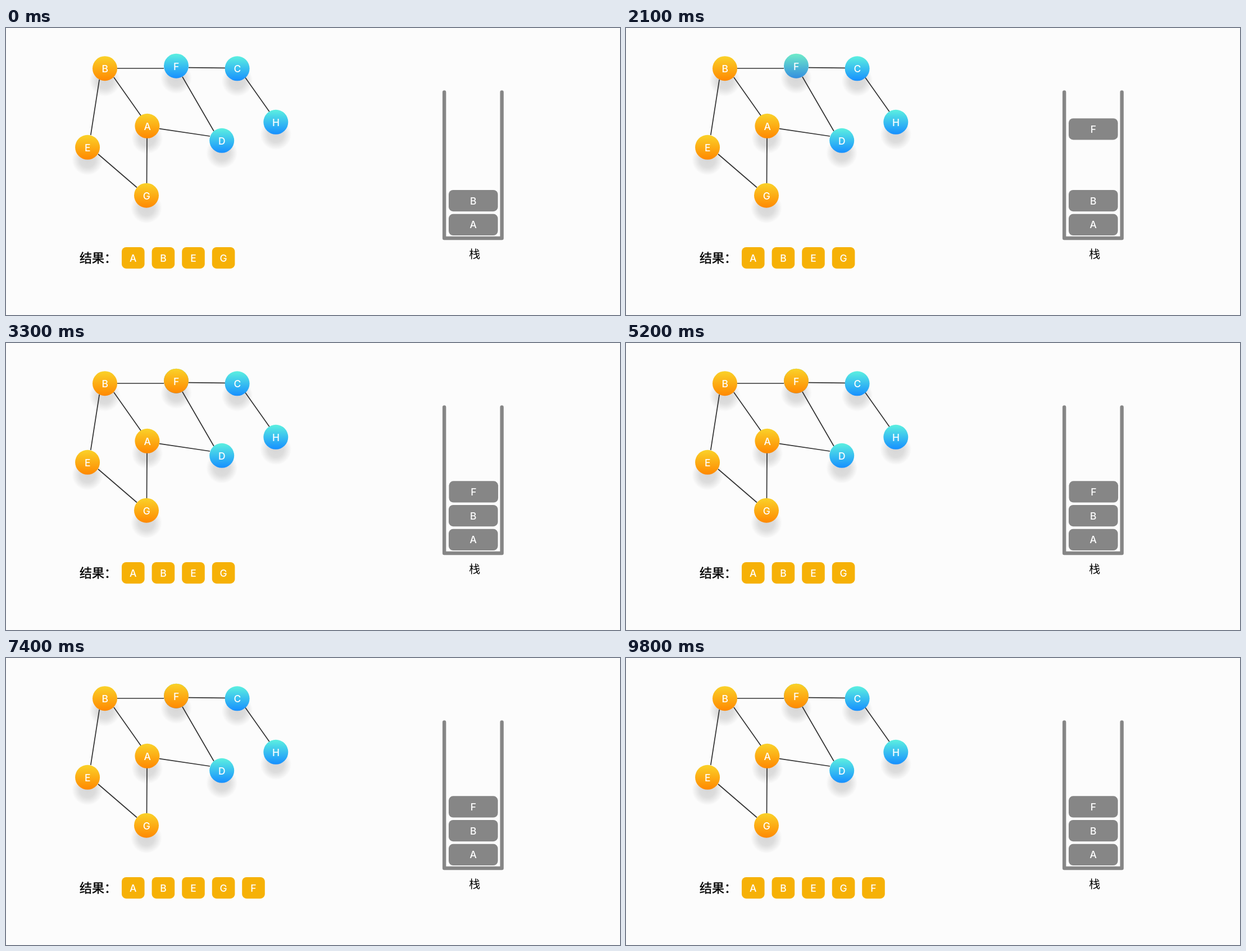
Animation, 1093 px wide and 512 px high, one loop 9.9 s. Source, as an HTML page with a canvas:

```html
<!DOCTYPE html>
<html lang="zh-CN">
<head>
<meta charset="utf-8">
<style>
html, body { margin: 0; width: 100%; height: 100%; overflow: hidden; background: #fcfcfc; }
canvas { display: block; }
</style>
</head>
<body>
<canvas id="stage" width="1093" height="512"></canvas>
<script>
const ctx = document.getElementById('stage').getContext('2d');
const LOOP = 9900, STEP = 100, R = 22;
const ORANGE = ['#fad229', '#ff8800'];
const BLUE = ['#5cf0e0', '#168fff'];
const GRAY = '#868686', GOLD = '#f6b106';
const LATIN = 'Inter, "Liberation Sans", sans-serif';
const CJK = '"Noto Sans CJK SC", "Noto Sans CJK", sans-serif';

const nodes = {
  B: [176, 72.2], F: [303, 67.7], C: [411.6, 72.3], H: [480.3, 167.8],
  A: [251.4, 174.8], D: [384.2, 200.8], E: [145.1, 212.8], G: [250, 298.7]
};
const visited = 'ABEG';
const edges = [
  [198, 72, 281, 72], [325, 70.6, 390, 71.4], [166.2, 92, 150.8, 191],
  [192, 88, 240.5, 157], [164, 225, 233, 284.5], [251, 196, 250.5, 277],
  [273, 179.6, 363, 193], [314, 87, 370, 184], [426, 88.5, 469, 149.5]
];

const ramp = (t, a, b) => Math.min(1, Math.max(0, (t - a) / (b - a)));
const ease = p => p * p * (3 - 2 * p);
const mix = (a, b, p) => a + (b - a) * p;

function letter(s, x, y, size = 17.5) {
  ctx.font = `500 ${size}px ${LATIN}`;
  ctx.textAlign = 'center';
  ctx.fillStyle = '#fff';
  ctx.fillText(s, x, y + size * 0.364);
}

function disc(x, y, fill, r = R) {
  ctx.fillStyle = fill;
  ctx.beginPath();
  ctx.arc(x, y, r, 0, Math.PI * 2);
  ctx.fill();
}

function ball(x, y, [top, bottom]) {
  const g = ctx.createLinearGradient(0, y - R, 0, y + R);
  g.addColorStop(0, top);
  g.addColorStop(1, bottom);
  disc(x, y, g);
}

function shadow(x, y) {
  const g = ctx.createRadialGradient(x, y, 0, x, y, 28);
  g.addColorStop(0, 'rgba(0,0,0,.15)');
  g.addColorStop(0.5, 'rgba(0,0,0,.125)');
  g.addColorStop(0.8, 'rgba(0,0,0,.05)');
  g.addColorStop(1, 'rgba(0,0,0,0)');
  disc(x, y, g, 28);
}

function card(s, x, y, w, h, color, alpha = 1) {
  if (!alpha) return;
  ctx.globalAlpha = alpha;
  ctx.fillStyle = color;
  ctx.beginPath();
  ctx.roundRect(x, y, w, h, 8);
  ctx.fill();
  letter(s, x + w / 2, y + h / 2 + 0.2);
  ctx.globalAlpha = 1;
}

const block = (s, x, y, alpha) => card(s, x, y, 87.6, 38.2, GRAY, alpha);
const tile = (s, x, alpha) => card(s, x, 390.9, 40.6, 38.3, GOLD, alpha);

function drawGraph(heat) {
  for (const [x, y] of Object.values(nodes)) shadow(x, y + 22);
  ctx.strokeStyle = '#333';
  ctx.lineWidth = 1.7;
  ctx.lineCap = 'butt';
  ctx.beginPath();
  for (const [x1, y1, x2, y2] of edges) {
    ctx.moveTo(x1, y1);
    ctx.lineTo(x2, y2);
  }
  ctx.stroke();
  for (const [name, [x, y]] of Object.entries(nodes)) {
    ball(x, y, visited.includes(name) ? ORANGE : BLUE);
    if (name === 'F' && heat) {
      ctx.globalAlpha = heat;
      ball(x, y, ORANGE);
      ctx.globalAlpha = 1;
    }
    letter(name, x + 0.2, y + 0.8);
  }
}

function drawLabels() {
  ctx.fillStyle = ctx.strokeStyle = '#000';
  ctx.textAlign = 'left';
  ctx.font = `22px ${CJK}`;
  ctx.lineWidth = 0.5;
  ctx.fillText('结果：', 131, 418.4);
  ctx.strokeText('结果：', 131, 418.4);
  ctx.textAlign = 'center';
  ctx.font = `20px ${CJK}`;
  ctx.fillText('栈', 834.3, 410.8);
}

function drawStack() {
  ctx.strokeStyle = GRAY;
  ctx.lineWidth = 6.4;
  ctx.lineCap = ctx.lineJoin = 'round';
  ctx.beginPath();
  ctx.moveTo(780.2, 114.5);
  ctx.lineTo(780.2, 375);
  ctx.lineTo(882.7, 375);
  ctx.lineTo(882.7, 114.5);
  ctx.stroke();
  block('A', 788, 331.8);
  block('B', 788, 289);
}

function draw(t) {
  const fall = ease(ramp(t, 2500, 3200));
  const result = ramp(t, 6000, 6700);
  ctx.fillStyle = '#fcfcfc';
  ctx.fillRect(0, 0, 1093, 512);
  drawGraph(ramp(t, 2000, 2800));
  drawLabels();
  drawStack();
  block('F', 788 + 0.5 * (fall - result), mix(161.2, 246.3, fall), ramp(t, 1400, 2000));
  [...visited].forEach((s, i) => tile(s, 206 + i * 53.6));
  tile('F', 420.2, result);
}

const start = performance.now();
function tick() {
  const t = (performance.now() - start) % LOOP;
  draw(Math.floor(t / STEP) * STEP);
  requestAnimationFrame(tick);
}
tick();
</script>
</body>
</html>
```
